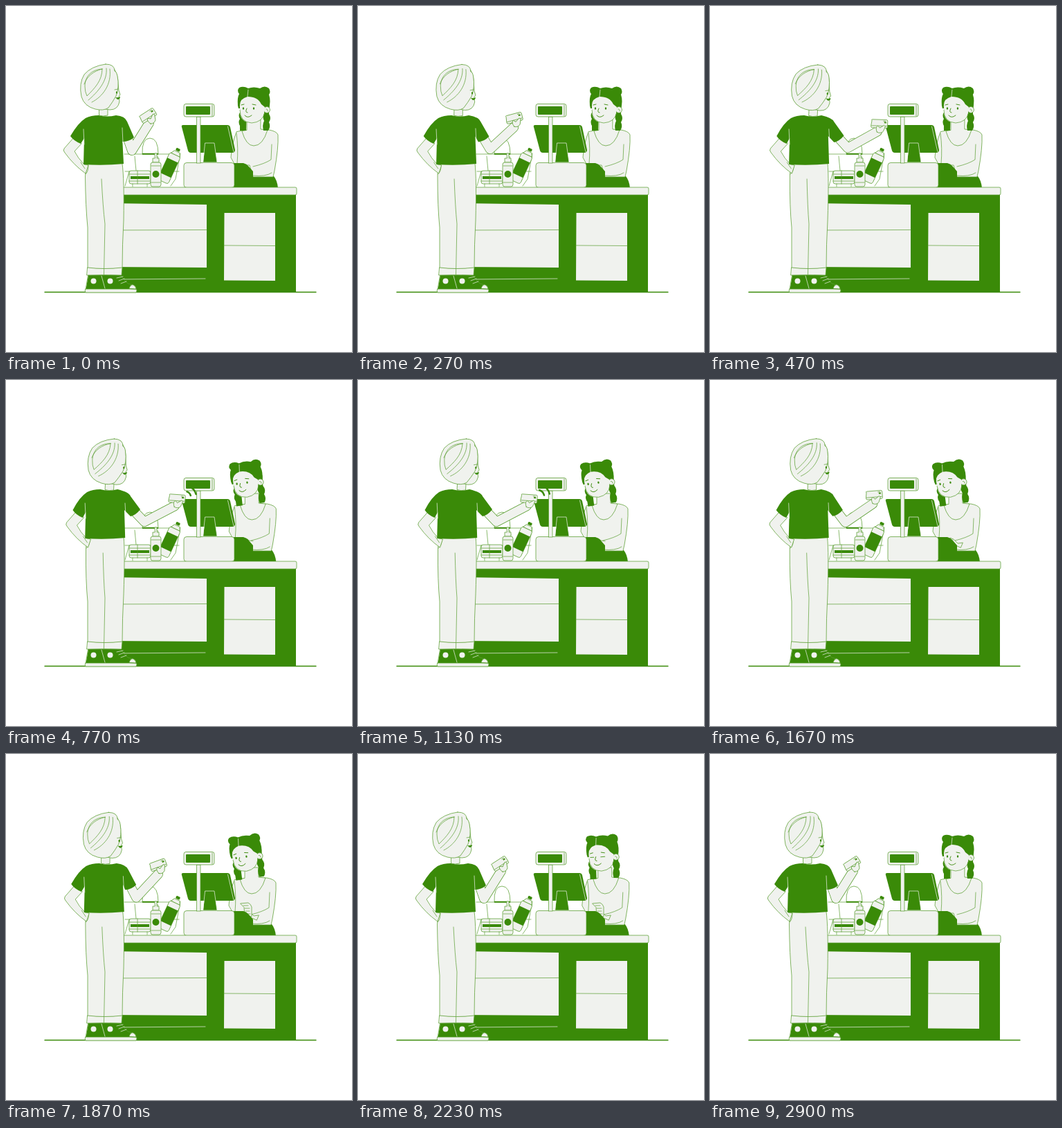
These frames come from a looping animation (500 px wide and 500 px high, 3000 ms). An HTML page:

```html
<!DOCTYPE html>
<html lang="en">
<head>
<meta charset="utf-8">
<title>Paying at the counter</title>
<style>
  html, body { margin: 0; width: 100%; height: 100%; overflow: hidden; background: #fff; }
  svg { display: block; width: 100vw; height: 100vh; }
  .g { fill: #3a8a08; }
  .l { fill: #f0f2ee; }
  .w { fill: #fff; }
  .o { stroke: #5a9e31; stroke-width: .75; }
  .n { fill: none; stroke: #5a9e31; stroke-width: .7; }
  .p { fill: none; stroke: #f0f2ee; stroke-width: .7; }
  path, line { stroke-linecap: round; stroke-linejoin: round; }
</style>
</head>
<body>
<svg viewBox="0 0 500 500">
  <path class="n" style="stroke-width:1.3;stroke:#3a8a08" d="M56 413.5H448"/>

  <g id="cashier">
    <g id="torso">
      <path class="g" d="M352 246H387Q392 252 393 263H352Z"/>
      <path class="l o" d="M333 182Q326 200 325 219L331 230H352L357 247H386L388 238Q394 205 393 186Q391 181 380 179L342 180Z"/>
      <path class="l o" d="M341 181Q347 202 358 202Q371 202 378 179L368 178V164H348V179Z"/>
      <path class="n" d="M333 184Q336 205 334 228M384 200L383 222Q374 228 357 232M357 245Q375 247 384 241"/>
    </g>
    <g id="girlHead">
      <path class="g" d="M337 139Q339 148 338 154Q335 158 338 163Q335 168 338 173L338 180H347L348 140ZM371 140L373 154Q370 160 373 166Q370 172 372 180H379Q383 174 380 168Q384 162 380 156L381 140Z"/>
      <path class="g" d="M335 144Q334 132 337 127Q333 122 337 118Q343 115 350 119Q358 116 367 119Q374 114 380 119Q383 124 380 128Q383 137 380 148H336Z"/>
      <circle class="l o" cx="377" cy="150" r="4.5"/>
      <path class="l" d="M338 143Q338 134 349 131Q364 131 369 142L374 146Q374 168 355 169Q338 168 338 152Z"/>
      <path class="n" d="M338 150Q338 168 355 169Q371 168 374 154M376 149Q379 149 378 152"/>
      <path class="p" d="M350 121L349 131"/>
      <path class="n" style="stroke:#3a8a08;stroke-width:.9" d="M348 148Q345 154 349 154M345 158Q349 163 355 158M340 143L344 142M356 142L361 143"/>
      <g id="eyes" class="g"><ellipse cx="343" cy="148" rx="1.2" ry="1.7"/><ellipse cx="358" cy="148" rx="1.2" ry="1.7"/></g>
      <path id="lids" class="n" style="stroke-width:1" d="M340 148.5H345M355 148.5H361"/>
    </g>
    <path id="palm" class="l o" d="M362 240L353 236Q346 228 347 226L352 228L358 234L365 233Z"/>
    <path id="fingers" class="n" d="M357 233Q351 233 346 229"/>
    <g id="receipt">
      <path class="l o" d="M339 216L350 215Q354 217 355 221V235L345 234L344 222Z"/>
      <path class="n" d="M343 219H350M345 223H352M346 227H352M347 231H353"/>
    </g>
  </g>

  <g id="condiments">
    <path class="w o" d="M197 214Q196 191 208 191Q220 191 220 214Z"/>
    <path class="n" d="M171 214H237M186 217L188 238M219 217L221 224M172 239H250M178 239L172 260M252 213L245 250L238 260"/>
    <path class="g" d="M197 212.8H220V214.5H197Z"/>
    <rect class="l o" x="178" y="238" width="31" height="19" rx="3"/>
    <path class="g" d="M180 246H207V250H180Z"/>
    <path class="n" d="M178 243H208M178 253H208M190 238V257M183 257V261M204 257V261"/>
    <g transform="rotate(25 237 230)">
      <rect class="l o" x="229" y="213" width="17" height="43" rx="3"/>
      <rect class="g" x="229" y="222" width="17" height="24"/>
      <path class="l o" d="M231 213L234 208H242L245 213Z"/>
      <rect class="g" x="235" y="203" width="6" height="4" rx="1"/>
    </g>
    <path class="l o" d="M215 213H218V220H221V226H212V220H215Z"/>
    <rect class="l o" x="209" y="226" width="15" height="35" rx="3"/>
    <circle class="g" cx="216.5" cy="243" r="5"/>
    <path class="n" d="M210 231H223M210 255H223"/>
  </g>

  <g id="register">
    <path class="g" d="M329 227H343Q347 228 350 231L357 239V262H329Z"/>
    <rect class="l o" x="257" y="226.5" width="73" height="36" rx="4"/>
    <path class="g" d="M256 172H320Q323 172 324 175L331 208Q331 212 327 212H267Q264 212 263 209L254 175Q253 172 256 172Z"/>
    <path class="p" d="M320.500 174L329 211"/>
    <path class="g" style="stroke:#f0f2ee;stroke-width:.7" d="M288 198H301L305 226H285Z"/>
    <rect class="l o" x="275.5" y="160" width="5.5" height="67"/>
    <rect class="l o" x="257" y="141.5" width="44" height="18.5" rx="3"/>
    <rect class="g" x="260" y="145" width="35" height="12" rx="1"/>
    <path class="n" d="M298 143V159"/>
  </g>

  <g id="counter">
    <rect class="g" x="150" y="272" width="269" height="141.5"/>
    <rect class="l o" x="150" y="262" width="270" height="11" rx="2"/>
    <path class="l" d="M150 285L290 287V378L150 377ZM315.500 299H389V397L315 396.500Z"/>
    <path class="n" d="M150 324L290 323.5M315 346L389 346.5"/>
    <path class="p" d="M160 395L288 394"/>
  </g>

  <g id="shoes">
    <path class="g o" d="M119 389H166Q170 396 176 401L186 404Q189 408 188 412H115Z"/>
    <path class="l o" d="M115 409H188Q190 411 188 414H115Q113 411 115 409ZM178 408Q180 402 184 403Q188 405 188 409Z"/>
    <circle class="l" cx="126.5" cy="397.5" r="4"/>
    <circle class="l" cx="150.5" cy="397.5" r="4"/>
    <path class="p" d="M138 390L143 408M160 393L169 391M163 397L171 394M166 401L174 398"/>
  </g>
  <g>
    <path id="trousers" class="l o"/>
    <path class="l o" d="M118 378Q142 381 168 378L167 389Q142 388 117 389Z"/>
    <path id="seam" class="n"/>
  </g>

  <g id="backArm">
    <path class="l o" d="M98 190L84 206Q82 209 85 212Q98 230 115 242L119 230L113 229Q104 220 99 210L109 199Z"/>
    <path class="n" d="M108 226L114 235"/>
  </g>
  <path id="armEdge" fill="none" stroke="#5a9e31"/>
  <path id="armFill" fill="none" stroke="#f0f2ee"/>
  <path id="shirt" class="g"/>
  <path id="folds" class="p"/>
  <g id="hand">
    <path class="l o" d="M-11 -4.5Q-12 -6 -10 -6H10Q12 -6 12 -4V4Q12 6 10 6H-10Q-12 6 -12 4Z"/>
    <path class="n" d="M-11 3H11M6 -4H9"/>
    <path class="l o" d="M-3 12Q-6 5 -2 3L1 6L7 2Q10 3 8 6L6 11Q2 15 -3 12Z"/>
    <path class="g" d="M7 -3H10V-1H7Z"/>
  </g>

  <g id="manHead">
    <path class="l o" d="M134.500 144V158Q140 160 147 158V145Z"/>
    <path class="l o" d="M157 92Q162 100 162 112L163 122L165 128L163 131L164 138Q162 150 150 150L138 148Z"/>
    <path class="l o" d="M144 84Q123 87 113 99Q105 112 109 131Q113 145 129 149Q141 152 148 147Q154 139 159 130Q164 117 161 101Q160 95 157 94Q157 84 144 84Z"/>
    <path class="n" d="M139 91C122 92 114 103 114 116Q114 124 117 130C128 119 139 108 139 91M145 90C147 108 133 124 119 136M150 91C153 113 140 131 124 139M113 113C117 101 127 94 139 91"/>
    <ellipse class="g" cx="160" cy="125" rx="1.1" ry="1.8"/>
    <path class="g" d="M158 132Q162 133 165 131Q165 135 161 135Z"/>
    <path class="n" d="M157 121L162 120"/>
  </g>

  <g id="waves" fill="none" stroke="#3a8a08" stroke-width="2.6"><path/><path/></g>
</svg>
<script>
  const LOOP = 3000;
  const $ = id => document.getElementById(id);
  const set = (el, name, value) => el.setAttribute(name, value);
  const show = (id, visible) => { $(id).style.display = visible ? '' : 'none'; };
  const mix = (a, b, k) => a + (b - a) * k;
  const ease = (t, from, to) => {
    const k = Math.min(1, Math.max(0, (t - from) / (to - from)));
    return k * k * (3 - 2 * k);
  };
  const waves = [...$('waves').children];

  function drawMan(k) {
    const x = 2.2 * k;
    const pt = (x0, y0, x1, y1) => `${mix(x0, x1, k)} ${mix(y0, y1, k)}`;

    set($('trousers'), 'd', `M${119 + x} 228Q${114 + k} 236 ${114.5 + k} 246
      Q115 290 118 320V379Q142 381 168 379Q168 345 170 310Q${171 + k} 250 ${168 + x} 228Z`);
    set($('seam'), 'd', `M${138 + x} 250Q${140 + k} 290 143 315L141.5 388M${119 + x} 230Q${119 + x} 240 ${115 + k} 243`);
    set($('backArm'), 'transform', `translate(${3.5 * k} 0)`);
    set($('manHead'), 'transform', `translate(${9 * k} ${.8 * k}) rotate(${3 * k} 142 150)`);

    const arm = `M${pt(172, 180, 180, 184)}L${pt(182, 209, 200, 205)}L${pt(207, 169, 244, 182)}`;
    for (const [id, width] of [['armEdge', 14], ['armFill', 12.5]]) {
      set($(id), 'd', arm);
      set($(id), 'stroke-width', width);
    }
    const lift = -12 * k * (1 - k);
    set($('hand'), 'transform', `translate(${pt(205, 158.5 + lift, 247, 171.5 + lift)}) rotate(${mix(-33, 4, k)})`);

    set($('shirt'), 'd', `M${134 + x} 158Q${146 + x} 161 ${159 + x} 158
      Q${pt(172, 159, 178, 162)} ${pt(175, 167, 180, 168)}
      L${pt(185, 190, 194, 187)}Q${pt(178, 196, 188, 195)} ${pt(168, 196, 180, 197)}
      L${pt(168, 189, 171, 188)}L${170 + x} 228Q${142 + x} 231 ${112 + x} 229
      L${113 + x} 191L${108 + 2.8 * k} 199Q${98 + 3 * k} 195 ${93 + 3.5 * k} 188
      Q${104 + x} 169 ${115 + x} 162Q${123 + x} 158 ${134 + x} 158Z`);
    set($('folds'), 'd', `M${112 + x} 178L${113 + x} 200M${pt(168, 176, 172, 178)}L${pt(169, 198, 173, 195)}`);
  }

  function drawCashier(t) {
    const k = ease(t, 450, 850) - ease(t, 1950, 2450);
    set($('torso'), 'transform', `translate(${-3 * k} 0)`);
    set($('girlHead'), 'transform', `translate(${-7 * k} 0) rotate(${-8.5 * k} 357 172)`);
    const blink = t > 2150 && t < 2290;
    show('eyes', !blink);
    show('lids', blink);

    const shown = ease(t, 1600, 1800) - ease(t, 2690, 2900);
    show('receipt', shown > .02);
    show('palm', shown > .02);
    show('fingers', k > .5 && shown < .02);
    set($('receipt'), 'transform', `translate(350 236) scale(${shown}) translate(-350 -236)`);
    set($('palm'), 'transform', `translate(0 ${3 * (1 - shown)})`);
  }

  // Two arcs spread from the phone towards the reader.
  function drawWaves(t) {
    set($('waves'), 'opacity', ease(t, 560, 660) - ease(t, 1500, 1580));
    const phase = ((t + 70) / 280) % 1;
    waves.forEach((wave, i) => {
      const r = 4 + 8 * ((phase + .5) % 1 + i);
      const point = a => `${259 + r * Math.cos(a)} ${169 - r * Math.sin(a)}`;
      set(wave, 'd', `M${point(1.25)}A${r} ${r} 0 0 1 ${point(.25)}`);
    });
  }

  function draw(t) {
    drawMan(ease(t, 0, 550) - ease(t, 1450, 2150));
    drawCashier(t);
    drawWaves(t);
  }

  const start = performance.now();
  function tick() {
    draw((performance.now() - start) % LOOP);
    requestAnimationFrame(tick);
  }
  tick();
</script>
</body>
</html>
```
